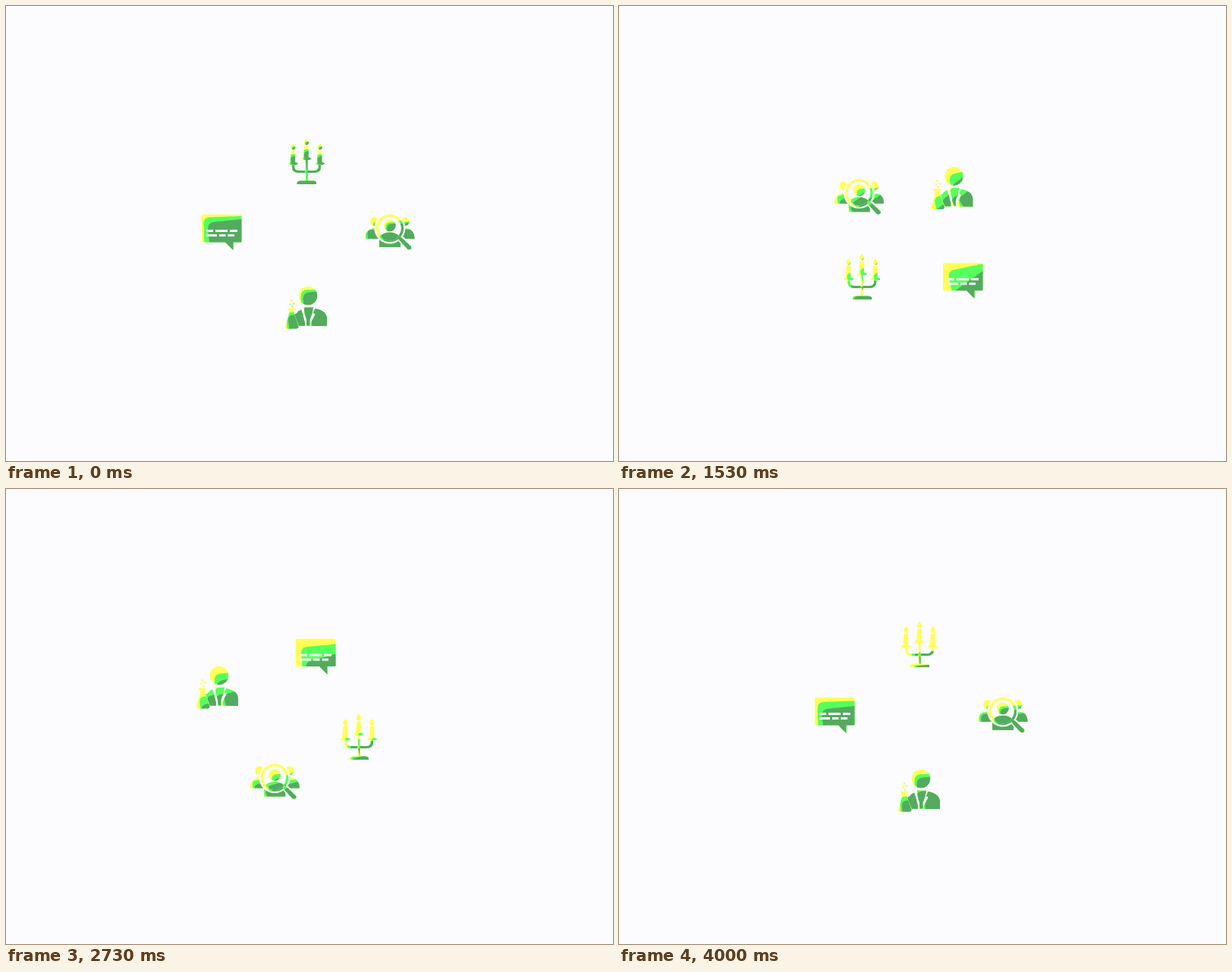
An HTML page with a canvas that plays this animation: 800x600 px, repeating every 4070 ms.

```html
<!DOCTYPE html>
<html lang="en">
<head>
<meta charset="utf-8">
<title>Circling icons</title>
<style>
  html, body { margin: 0; width: 100%; height: 100%; overflow: hidden; background: #fcfcfe; }
  canvas { display: block; }
  svg { position: absolute; visibility: hidden; }
</style>
</head>
<body>
<canvas id="stage" width="800" height="600"></canvas>
<svg id="ruler" width="0" height="0"></svg>
<script>
const BG = '#fcfcfe', YELLOW = '#ffff55', GREEN = '#55ff5c', DARK = '#54ab60';
const LOOP = 4070, STEP = 200 / 3;
const ctx = document.getElementById('stage').getContext('2d');
const ruler = document.getElementById('ruler');

const disc = (x, y, r) =>
  `M${x - r} ${y}a${r} ${r} 0 1 0 ${2 * r} 0a${r} ${r} 0 1 0 ${-2 * r} 0z`;
const box = (x, y, w, h) => `M${x} ${y}h${w}v${h}h${-w}z`;
const flame = (x, y) => `M${x} ${y}q3.2 3.5 3 6 -.6 2.8 -3 2.8t-3 -2.8q-.2 -2.5 3 -6z`;
const candle = (x, y) =>
  `M${x - 2.8} ${y}h5.6v15l3.4 1.2v1.3l-3 1h-6.4l-3 -1v-1.3l2.4 -1.2z`;
const candles = [[378.3, 181], [395.9, 174.5], [413.6, 181]];

// The colours sink and rise once per loop, and lean over between two stops.
const swell = t => Math.sin(Math.PI * t / 4.4);
const lean = t => Math.sin(Math.PI * t) ** 4;

// stops: offsets visited between leaving and returning home.
// level: how far down the yellow reaches.
// parts: [outline, shift]; shift darkens a part, a part without it is a cut-out.
const icons = [
  { // candelabra
    stops: [[-120, 97], [-17, 175], [87, 90]],
    level: t => 0.25 + 0.2 * t,
    parts: [
      ['M377 210v2q0 8 9 8h20q9 0 9 -8v-2h-3v1q0 6 -6 6h-20q-6 0 -6 -6v-1z', .6],
      [box(394.5, 202, 3, 29), .6],
      ['M383.5 235v-2q1 -2.5 4 -2.5h17q4 0 4.5 2.5v2z', .6],
      ...candles.map(([x, y]) => [candle(x, y + 10), 0]),
      ...candles.map(([x, y]) => [flame(x, y), -.2])
    ]
  },
  { // people under a magnifier
    stops: [[-113, -79.5], [-236, 8], [-110.5, 99.5]],
    level: t => 0.25 + 0.25 * swell(t),
    parts: [
      [disc(486, 284, 6), -.3], [disc(525.5, 284, 6), -.3],
      ['M473.2 307q0 -13.5 13.5 -14h8v14z', .2],
      ['M514 307v-14h11q13.5 .5 13.5 14z', .2],
      [box(492, 305, 28, 13), .6],
      [disc(505.8, 293, 20.5)],
      ['M511 303l5 -5 20 17v6l-8 3 -12 -16z'],
      [disc(505.8, 293, 18.2), 0],
      [disc(505.8, 293, 15)],
      ['M515.5 304.5l2 -2 4.5 3.5 11.3 10.5q2 2.5 0 4 -2.5 1.5 -4.5 -.3l-9.8 -10.7z', .6],
      [disc(505.8, 289.5, 7.8), 0],
      ['M493.5 303q5 -4.5 12.2 -4.5t12.2 4.5q-4 6.5 -12.2 6.5t-12.2 -6.5z', .4]
    ]
  },
  { // scientist with a flask
    stops: [[94, -89.5], [-22, -193], [-134, -99.5]],
    level: t => 0.2 + 0.25 * swell(t),
    parts: [
      [disc(398, 382, 12.2), 0],
      ['M407.5 399q14.5 2.5 15.5 12.5v10.5h-21.3v-4l6 -11.5 -3 -2z', .5],
      ['M392.5 397.5h12.5l-1.5 8 -3 8v8h-4.5v-8l-2.5 -8z', .4],
      ['M386 421.8l-6.5 -16q3 2 5.5 -3l4 -2.5 2 6 3 11.5v4z', .4],
      ['M371 398.5h10v2.5h-1.5v5l6 16.5q0 3 -3 3h-12q-3 0 -2.5 -3l5 -16.5v-5h-2z', 0],
      [disc(376, 388, 1.3), -.5], [disc(379, 391.5, 1.3), -.5],
      [disc(374.2, 392.5, 1.3), -.5], [disc(377, 396, 1.3), -.5]
    ]
  },
  { // speech bubble
    stops: [[103, 98], [202.5, 8.5], [84.5, -94]],
    level: t => 0.08 + 0.17 * swell(t),
    parts: [
      ['M259.5 275h49.5q1.5 0 1.5 1.5v33.5q0 1.5 -1.5 1.5h-9.5v10.5l-10.5 -10.5h-29.5q-1.5 0 -1.5 -1.5v-33.5q0 -1.5 1.5 -1.5z', 0],
      [box(264, 295, 9, 3) + box(276, 295, 16, 3) + box(295, 295, 10, 3)],
      [box(264, 301, 14, 3) + box(281, 301, 8.5, 3) + box(292.5, 301, 8.5, 3)]
    ]
  }
];

function measure(d) {
  const path = document.createElementNS('http://www.w3.org/2000/svg', 'path');
  path.setAttribute('d', d);
  ruler.append(path);
  return path;
}

// Smooth curve from home through the stops and back, one path per leg.
function legs(stops) {
  const points = [[0, 0], ...stops, [0, 0]];
  const last = points.length - 1;
  const tangent = (i, axis) =>
    i === 0 || i === last ? 0 : (points[i + 1][axis] - points[i - 1][axis]) / 6;
  const handle = (i, sign) => [0, 1].map(axis => points[i][axis] + sign * tangent(i, axis));
  return points.slice(1).map((end, i) =>
    measure(`M${points[i]}C${handle(i, 1)} ${handle(i + 1, -1)} ${end}`));
}

for (const icon of icons) {
  icon.legs = legs(icon.stops);
  icon.parts = icon.parts.map(([d, shift]) =>
    ({ shape: new Path2D(d), shift, bounds: measure(d).getBBox() }));
}

function place(icon, t) {
  const i = Math.min(3, Math.floor(t));
  const leg = icon.legs[i];
  return leg.getPointAtLength(leg.getTotalLength() * (t - i));
}

// Tilted sheet with one rounded corner at a fraction of the part's bounds.
function sheet({ bounds: b, shift }, fx, fy, tilt, color) {
  const r = Math.min(9, 0.4 * Math.min(b.width, b.height));
  ctx.save();
  ctx.translate(b.x + b.width * (fx - shift / 2), b.y + b.height * (fy - shift));
  ctx.rotate(tilt * Math.PI / 180);
  ctx.beginPath();
  ctx.moveTo(0, 150);
  ctx.lineTo(0, r);
  ctx.quadraticCurveTo(0, 0, r, 0);
  ctx.lineTo(150, 0);
  ctx.lineTo(150, 150);
  ctx.fillStyle = color;
  ctx.fill();
  ctx.restore();
}

function drawPart(part, level, t) {
  const cutOut = part.shift === undefined;
  ctx.fillStyle = cutOut ? BG : YELLOW;
  ctx.fill(part.shape);
  if (cutOut) return;
  const tilt = -2 - 10 * lean(t);
  const depth = 0.15 + 0.2 * swell(t) + 0.3 * lean(t);
  ctx.save();
  ctx.clip(part.shape);
  sheet(part, level / 2, level, tilt, GREEN);
  sheet(part, level / 2 + 0.1, level + depth, tilt * 3, DARK);
  ctx.restore();
}

function draw(now) {
  const step = Math.min(60, Math.floor((now % LOOP + 4) / STEP));
  const t = step * STEP / 1000;
  ctx.fillStyle = BG;
  ctx.fillRect(0, 0, 800, 600);
  for (const icon of icons) {
    const { x, y } = place(icon, t);
    ctx.save();
    ctx.translate(x, y);
    for (const part of icon.parts) drawPart(part, icon.level(t), t);
    ctx.restore();
  }
}

const start = performance.now();
function tick() {
  draw(performance.now() - start);
  requestAnimationFrame(tick);
}
tick();
</script>
</body>
</html>
```
